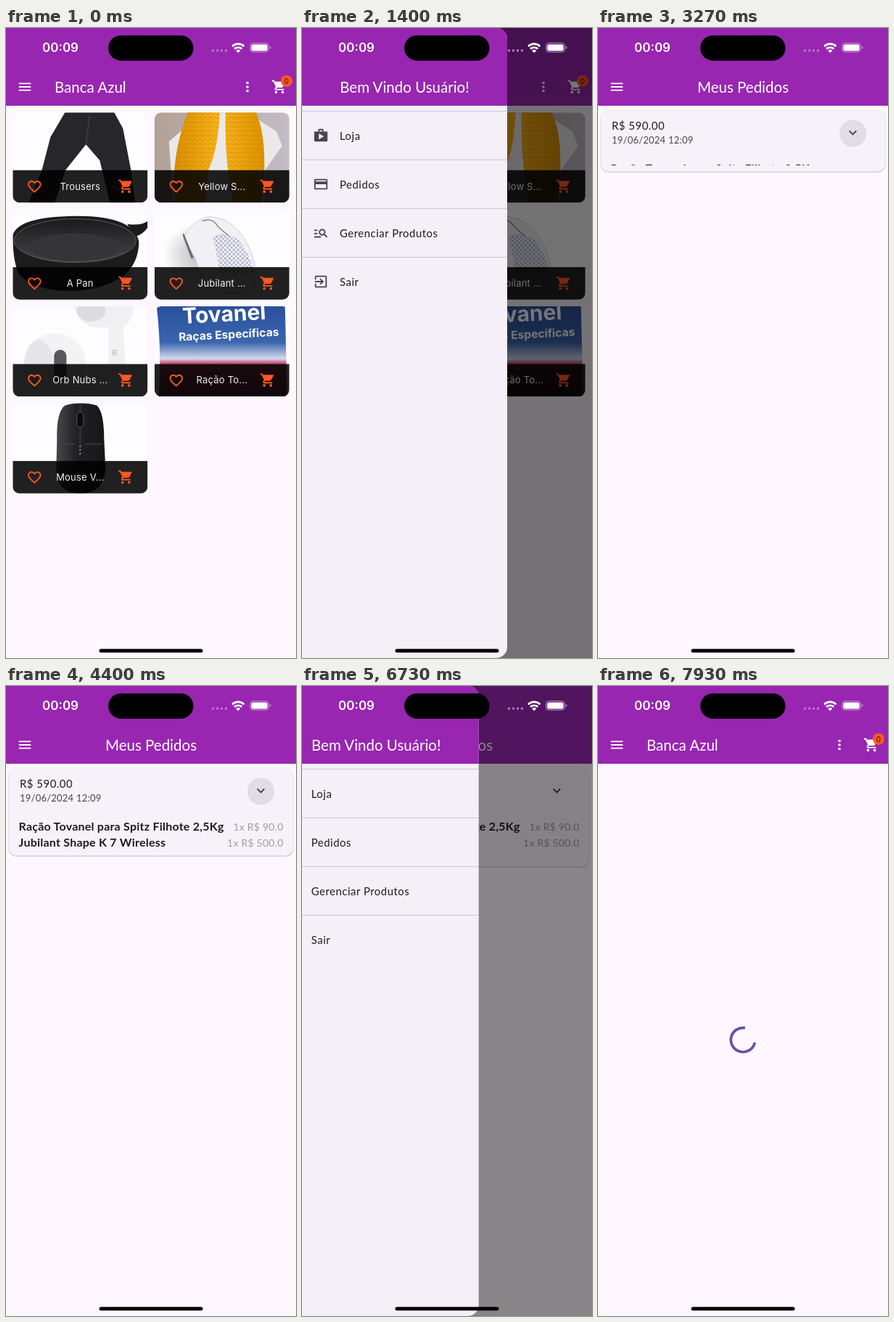
Write an HTML page that moves like this. It is 400 px wide and 867 px high and loops after 8 s.

```html
<!DOCTYPE html>
<html lang="pt">
<head>
<meta charset="utf-8">
<title>Loja</title>
<style>
html, body { margin: 0; width: 100%; height: 100%; overflow: hidden; background: #fef7ff; }
svg.stage { display: block; width: 400px; height: 867px; }
text { font-family: Lato, sans-serif; white-space: pre; }
.ui { font-family: Inter, Roboto, sans-serif; }
.title { font-size: 20.5px; fill: #fff; }
.body { font-size: 14.9px; letter-spacing: .52px; fill: #1d1b20; }
.small { font-size: 13px; letter-spacing: .23px; fill: #49454f; }
.item { font-size: 16px; font-weight: 700; letter-spacing: .23px; fill: #1d1b20; }
.price { font-size: 14px; letter-spacing: .23px; fill: #9e9e9e; text-anchor: end; }
.label { font-size: 13px; letter-spacing: .2px; fill: #f4f0f5; text-anchor: middle; }
.mid { text-anchor: middle; }
.page { fill: #fef7ff; }
.bar { fill: #9826b1; }
.hot { fill: #ff5722; }
</style>
</head>
<body>
<svg class="stage" viewBox="0 0 400 867">
  <defs>
    <symbol id="menu" viewBox="0 0 24 24"><path d="M3 18h18v-2H3zm0-5h18v-2H3zm0-7v2h18V6z"/></symbol>
    <symbol id="more" viewBox="0 0 24 24"><circle cx="12" cy="6" r="2"/><circle cx="12" cy="12" r="2"/><circle cx="12" cy="18" r="2"/></symbol>
    <symbol id="cart" viewBox="0 0 24 24"><path d="M7 18c-1.1 0-1.99.9-1.99 2S5.9 22 7 22s2-.9 2-2-.9-2-2-2zM1 2v2h2l3.6 7.59-1.35 2.45c-.16.28-.25.61-.25.96 0 1.1.9 2 2 2h12v-2H7.42c-.14 0-.25-.11-.25-.25l.03-.12.9-1.63h7.45c.75 0 1.41-.41 1.75-1.03l3.58-6.49c.08-.14.12-.31.12-.48 0-.55-.45-1-1-1H5.21l-.94-2H1zm16 16c-1.1 0-1.99.9-1.99 2s.89 2 1.99 2 2-.9 2-2-.9-2-2-2z"/></symbol>
    <symbol id="heart" viewBox="0 0 24 24"><path d="M16.5 3c-1.74 0-3.41.81-4.5 2.09C10.91 3.81 9.24 3 7.5 3 4.42 3 2 5.42 2 8.5c0 3.78 3.4 6.86 8.55 11.54L12 21.35l1.45-1.32C18.6 15.36 22 12.28 22 8.5 22 5.42 19.58 3 16.5 3zm-4.4 15.55l-.1.1-.1-.1C7.14 14.24 4 11.39 4 8.5 4 6.5 5.5 5 7.5 5c1.54 0 3.04.99 3.57 2.36h1.87C13.46 5.99 14.96 5 16.5 5c2 0 3.5 1.5 3.5 3.5 0 2.89-3.14 5.74-7.9 10.05z"/></symbol>
    <symbol id="bag" viewBox="0 0 24 24"><path d="M16 6V4c0-1.11-.89-2-2-2h-4c-1.11 0-2 .89-2 2v2H2v13c0 1.11.89 2 2 2h16c1.11 0 2-.89 2-2V6h-6zm-6-2h4v2h-4V4zM9 18V9l7.5 4L9 18z"/></symbol>
    <symbol id="card" viewBox="0 0 24 24"><path d="M20 4H4c-1.11 0-1.99.89-1.99 2L2 18c0 1.11.89 2 2 2h16c1.11 0 2-.89 2-2V6c0-1.11-.89-2-2-2zm0 14H4v-6h16v6zm0-10H4V6h16v2z"/></symbol>
    <symbol id="manage" viewBox="0 0 24 24"><path d="M7 9H2V7h5v2zm0 3H2v2h5v-2zm13.59 7l-3.83-3.83c-.8.52-1.74.83-2.76.83-2.76 0-5-2.24-5-5s2.24-5 5-5 5 2.24 5 5c0 1.02-.31 1.96-.83 2.75L22 17.59 20.59 19zM17 11c0-1.65-1.35-3-3-3s-3 1.35-3 3 1.35 3 3 3 3-1.35 3-3zM2 19h10v-2H2v2z"/></symbol>
    <symbol id="exit" viewBox="0 0 24 24"><path d="M10.09 15.59L11.5 17l5-5-5-5-1.41 1.41L12.67 11H3v2h9.67l-2.58 2.59zM19 3H5c-1.11 0-2 .9-2 2v4h2V5h14v14H5v-4H3v4c0 1.1.89 2 2 2h14c1.1 0 2-.9 2-2V5c0-1.1-.9-2-2-2z"/></symbol>
    <symbol id="down" viewBox="0 0 24 24"><path d="M16.59 8.59L12 13.17 7.41 8.59 6 10l6 6 6-6z"/></symbol>

    <linearGradient id="sack" x2="0" y2="1">
      <stop offset="0" stop-color="#2a4f9c"/><stop offset=".4" stop-color="#3a66ae"/>
      <stop offset=".58" stop-color="#d5d9ea"/><stop offset=".63" stop-color="#c4517c"/><stop offset="1" stop-color="#7a2c50"/>
    </linearGradient>
    <linearGradient id="wall"><stop offset="0" stop-color="#b3a194"/><stop offset="1" stop-color="#c3bcc6"/></linearGradient>
    <linearGradient id="iron" x2="0" y2="1">
      <stop offset="0" stop-color="#1b1b1d"/><stop offset="1" stop-color="#454547"/>
    </linearGradient>
    <linearGradient id="shell"><stop offset="0" stop-color="#48484b"/><stop offset=".4" stop-color="#222225"/><stop offset="1" stop-color="#161618"/></linearGradient>
    <linearGradient id="silk"><stop offset="0" stop-color="#d98d00"/><stop offset=".5" stop-color="#f9b51c"/><stop offset="1" stop-color="#dd9200"/></linearGradient>
    <radialGradient id="shade"><stop offset="0" stop-color="#b4b4b8"/><stop offset="1" stop-color="#b4b4b8" stop-opacity="0"/></radialGradient>
    <pattern id="knit" width="7" height="6" patternUnits="userSpaceOnUse"><path d="M0 0l3.5 3L7 0" fill="none" stroke="#b87400" stroke-opacity=".55"/></pattern>
    <pattern id="holes" width="6" height="6" patternUnits="userSpaceOnUse"><circle cx="1.5" cy="1.5" r="1.4" fill="#8fa3c8"/><circle cx="4.5" cy="4.5" r="1.4" fill="#b8aac6"/></pattern>
    <clipPath id="round"><rect width="186" height="124" rx="9.3"/></clipPath>
    <clipPath id="reveal"><rect id="window" x="4" y="183" width="392"/></clipPath>

    <g id="shopBar">
      <rect class="bar" width="400" height="107"/>
      <g fill="#fff">
        <use href="#menu" x="15" y="70" width="22" height="22"/>
        <use href="#more" x="322" y="70" width="22" height="22"/>
        <use href="#cart" x="366" y="70" width="22" height="22"/>
      </g>
      <text class="title" x="67" y="89">Banca Azul</text>
      <circle class="hot" cx="387" cy="73" r="8"/>
      <text class="ui mid" x="387" y="76.6" font-size="10" fill="#1d1b20">0</text>
    </g>

    <g id="drawer">
      <path fill="#f5eff8" d="M0 0H268a15 15 0 0 1 15 15V852a15 15 0 0 1-15 15H0z"/>
      <path class="bar" d="M0 0H268a15 15 0 0 1 15 15V107H0z"/>
      <text class="title mid" x="141.5" y="89">Bem Vindo Usuário!</text>
      <g id="entries"></g>
    </g>
  </defs>

  <g id="shop">
    <rect class="page" width="400" height="867"/>
    <use href="#shopBar"/>
    <g id="grid"></g>
  </g>

  <g id="orders">
    <rect class="page" width="400" height="867"/>
    <rect class="bar" width="400" height="107"/>
    <use href="#menu" x="15" y="70" width="22" height="22" fill="#fff"/>
    <text class="title mid" x="200" y="89">Meus Pedidos</text>
    <rect id="shadow" x="3.5" y="112" width="393" rx="11" fill="#cfc8d4"/>
    <rect id="panel" x="4" y="111" width="392" rx="11" fill="#f7f2fa"/>
    <text class="body" x="19" y="139.7">R$ 590.00</text>
    <text class="small" x="19" y="159">19/06/2024 12:09</text>
    <circle id="ripple" cx="351.5" cy="145" r="18.6" fill="#e2dce6"/>
    <use href="#down" x="340.5" y="133" width="22" height="22" fill="#49454f"/>
    <g clip-path="url(#reveal)">
      <text class="item" x="17.5" y="199">Ração Tovanel para Spitz Filhote 2,5Kg</text>
      <text class="price" x="382.5" y="199">1x R$ 90.0</text>
      <text class="item" x="17.5" y="221">Jubilant Shape K 7 Wireless</text>
      <text class="price" x="382.5" y="221">1x R$ 500.0</text>
    </g>
  </g>

  <g id="loading">
    <rect class="page" width="400" height="867"/>
    <use href="#shopBar"/>
    <circle id="spinner" cx="200" cy="487" r="16.7" fill="none" stroke="#6750a4" stroke-width="3.7" stroke-linecap="square" pathLength="360"/>
  </g>

  <g id="system">
    <text class="ui mid" x="75" y="33.2" font-size="17" font-weight="600" fill="#fff">00:09</text>
    <rect x="141" y="10.3" width="117.5" height="34.6" rx="17.3"/>
    <path d="M285.5 31H304" stroke="#c078cc" stroke-width="3.4" stroke-linecap="round" stroke-dasharray="0 6"/>
    <g fill="none" stroke="#fff" stroke-width="2.7">
      <path d="M312 25.2a11.8 11.8 0 0 1 16.4 0M315 28.8a7.6 7.6 0 0 1 10.4 0"/>
    </g>
    <path d="M317.2 31.2a4.3 4.3 0 0 1 6 0l-3 3z" fill="#fff"/>
    <rect x="336.5" y="20.7" width="26" height="12.4" rx="4" fill="none" stroke="#c98fd2"/>
    <rect x="338.2" y="22.4" width="22.6" height="9" rx="2.5" fill="#fff"/>
    <path d="M364 24.8a2.4 2.4 0 0 1 0 4.4z" fill="#c98fd2"/>
    <rect x="128.5" y="854.5" width="143" height="5" rx="2.5"/>
  </g>
</svg>

<script>
const $ = id => document.getElementById(id);
const set = (id, attrs) => { for (const k in attrs) $(id).setAttribute(k, attrs[k]); };
const icon = (name, x, y, fill, size = 22) =>
  `<use href="#${name}" x="${x - size / 2}" y="${y - size / 2}" width="${size}" height="${size}" fill="${fill}"/>`;

const scarf = 'M46 0H90Q88 50 74 80L70 124H28Q22 60 46 0zM98 0H140Q158 40 148 124H108Q96 60 98 0z';

const products = [
  ['Trousers', `<path fill="#26262b" d="M72 0H140L152 22 163 79 169 124H134L120 66 101 44 73 79 58 124H22L40 80 52 34z"/>
    <path d="M101 44L106 4" stroke="#3a3a40" stroke-width="2"/>`],
  ['Yellow S...', `<rect width="186" height="124" fill="url(#wall)"/>
    <path fill="#ebe8ea" d="M20 40L66 0H128L168 26 176 46 152 80V124H26z"/>
    <path fill="url(#silk)" d="${scarf}"/><path fill="url(#knit)" d="${scarf}"/>`],
  ['A Pan', `<path fill="#1c1c1e" d="M158 20Q176 23 186 16V25Q180 34 168 38zM0 36Q6 10 86 9T174 44Q174 74 152 92 120 112 80 112 26 112 8 88 0 70 0 36z"/>
    <ellipse cx="86" cy="43" rx="84" ry="30" fill="url(#iron)" stroke="#5a5a5c"/><ellipse cx="86" cy="52" rx="64" ry="19" fill="#353537"/>`],
  ['Jubilant ...', `<ellipse cx="66" cy="62" rx="54" ry="44" fill="url(#shade)"/>
    <path fill="#f1f1f4" stroke="#cfcfd6" d="M40 42Q46 18 74 10 104 10 124 40 144 72 138 108 112 122 82 112 64 96 56 66z"/>
    <path fill="url(#holes)" d="M80 38Q98 28 116 42 136 68 136 90H90Q86 58 80 38z"/>
    <path fill="#6a6a70" d="M40 32l14 34-3 2-12-32z"/><path d="M66 16q14-6 22 8l14 12" fill="none" stroke="#85858c" stroke-width="1.5"/>`],
  ['Orb Nubs ...', `<path fill="#f0f0f2" d="M84 0H166Q166 22 152 28L156 90H132V28Q96 36 84 0z"/>
    <ellipse cx="108" cy="6" rx="20" ry="15" fill="#dcdce0"/>
    <circle cx="58" cy="80" r="43" fill="#f3f3f5"/><ellipse cx="36" cy="80" rx="20" ry="34" fill="#e6e6ea"/>
    <rect x="57" y="60" width="17" height="44" rx="8" fill="#58585c"/>
    <text class="ui" x="137" y="68" font-size="11" fill="#b0b0b4">R</text>`],
  ['Ração To...', `<path fill="url(#sack)" d="M3 0H180L183 124H6Q10 60 3 0z"/>
    <g fill="#fff" font-weight="700" transform="rotate(-3 94 30)">
    <text class="ui mid" x="97" y="21" font-size="30">Tovanel</text>
    <text class="ui mid" x="102" y="44.5" font-size="15.6">Raças Específicas</text></g>`],
  ['Mouse V...', `<path fill="url(#shell)" d="M72 3Q93-4 116 3 126 12 126 50L128 90Q126 124 93 124T60 90L61 50Q60 12 72 3z"/>
    <path d="M62 56H86M100 56H124M93 0V12M93 33V56" stroke="#3c3c40" stroke-width="1.5"/>
    <rect x="88.5" y="12" width="9" height="21" rx="4.5" fill="#0c0c0e" stroke="#55555a"/>
    <path d="M93 58V70" stroke="#9a9aa0" stroke-width="2" stroke-dasharray="2 3"/>
    <circle cx="93" cy="98" r="6" fill="#1f4a4a"/>`]
];

$('grid').innerHTML = products.map(([name, art], i) => `
  <g transform="translate(${i % 2 ? 204.8 : 9.3} ${116.3 + (i >> 1) * 133.4})">
    <g clip-path="url(#round)">
      <rect width="186" height="124" fill="#fdfcfe"/>${art}
      <rect y="79.4" width="186" height="45" fill="#000" fill-opacity=".87"/>
    </g>
    ${icon('heart', 30, 102, '#ff5722')}${icon('cart', 156, 101.5, '#ff5722')}
    <text class="label ui" x="93" y="106.4">${name}</text>
  </g>`).join('');

$('entries').innerHTML = [['bag', 'Loja'], ['card', 'Pedidos'], ['manage', 'Gerenciar Produtos'], ['exit', 'Sair']]
  .map(([name, label], i) => {
    const y = 148 + i * 67;
    return `<path d="M0 ${y - 33.6}H283" stroke="#cac4d0"/>${icon(name, 26, y, '#49454f')}
      <text class="body" x="52" y="${y + 5.5}">${label}</text>`;
  }).join('');

for (const page of ['shop', 'orders']) {
  $(page).insertAdjacentHTML('beforeend', `
    <rect id="${page}Scrim" width="400" height="867" fill="#000" fill-opacity=".54"/>
    <use id="${page}Drawer" href="#drawer"/>`);
}

const LOOP = 8000, STEP = 1000 / 15;
const TOGGLES = [3198, 4332, 4732];
const clamp = v => Math.min(1, Math.max(0, v));

// Critically damped fling, 0 to 1
function spring(ms) {
  if (ms <= 0) return 0;
  const a = 22.36 * ms / 1000, x = 1 - (1 + a) * Math.exp(-a);
  return x > .992 ? 1 : x;
}

// cubic-bezier(.4, 0, .2, 1)
function ease(x) {
  let lo = 0, hi = 1;
  for (let i = 0; i < 20; i++) {
    const u = (lo + hi) / 2, v = 1 - u;
    if (1.2 * v * v * u + .6 * v * u * u + u ** 3 < x) lo = u; else hi = u;
  }
  return lo * lo * (3 - 2 * lo);
}

function moveDrawer(page, p) {
  set(page + 'Scrim', { opacity: p });
  set(page + 'Drawer', { x: 283 * (p - 1), visibility: p ? 'visible' : 'hidden' });
}

function expandPanel(t) {
  const [a, b, c] = TOGGLES.map(s => clamp((t - s) / 300));
  const grow = 66 * (a - b + c);
  set('panel', { height: 71.5 + grow });
  set('shadow', { height: 71.7 + grow });
  set('window', { height: Math.max(0, grow - 9) });
  const since = t - Math.max(...TOGGLES.filter(s => s < t), -LOOP);
  set('ripple', { opacity: clamp((400 - since) / 240) });
}

function spin(t) {
  const head = 270 * ease(clamp(t / 666.5));
  const turn = -90 + 360 * t / 2222 + 90 * t / 1333;
  set('spinner', { 'stroke-dasharray': `${head} 400`, transform: `rotate(${turn} 200 487)` });
}

function draw(t) {
  moveDrawer('shop', spring(t - 10));
  moveDrawer('orders', spring(t - 6578));
  set('orders', { opacity: clamp((t - 1450) / 320) });
  expandPanel(t);
  set('loading', { visibility: t > 7460 ? 'visible' : 'hidden' });
  spin(Math.max(0, t - 7460));
}

const start = performance.now();
function tick() {
  const t = (performance.now() - start) % LOOP;
  draw(Math.floor((t + 5) / STEP) % 120 * STEP);
  requestAnimationFrame(tick);
}
tick();
</script>
</body>
</html>
```
